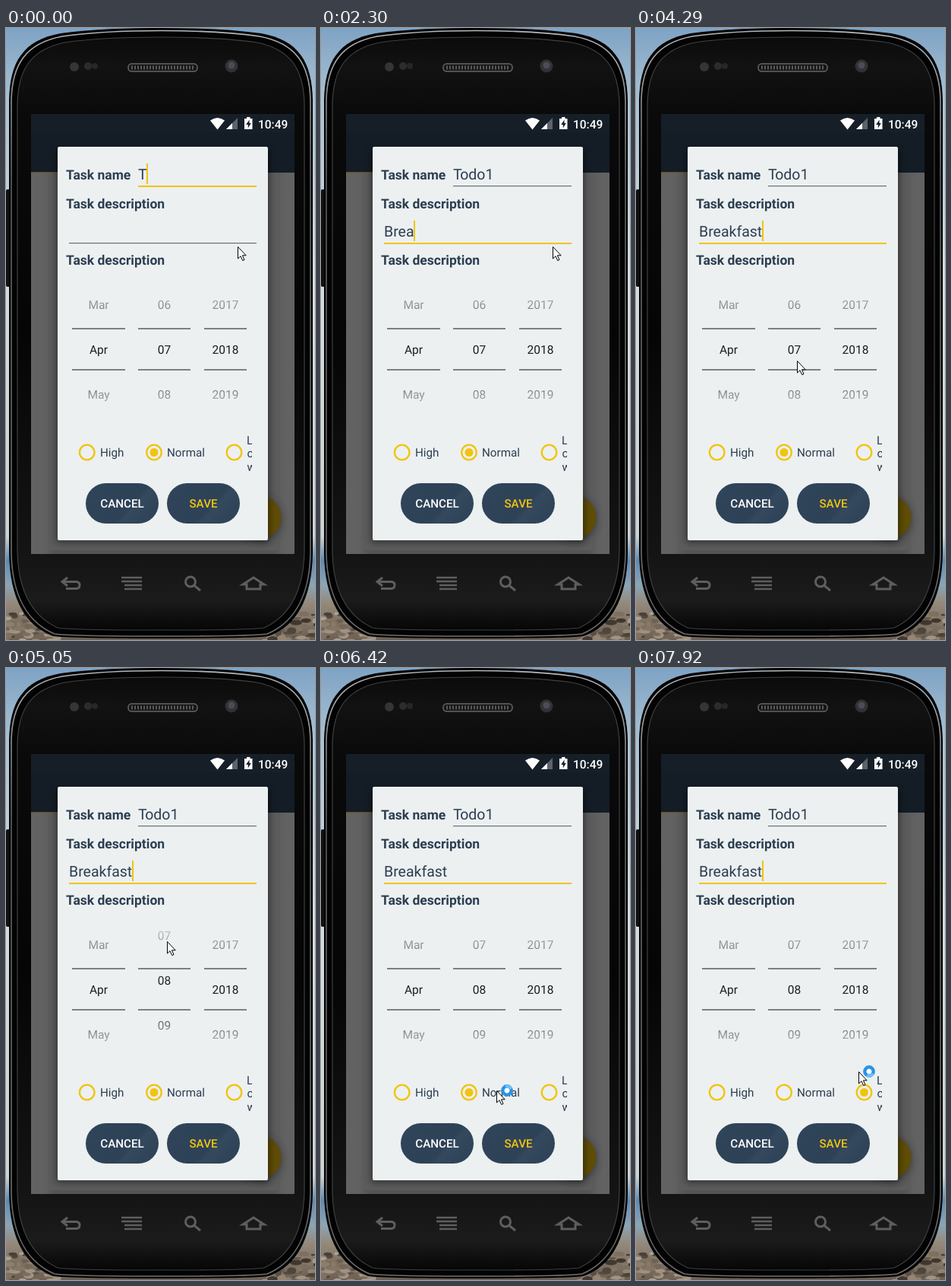
These frames come from a looping animation (407 px wide and 804 px high, 8000 ms). An HTML page:

```html
<!DOCTYPE html>
<html lang="en">
<head>
<meta charset="utf-8">
<title>Add task dialog</title>
<style>
  html, body { margin: 0; width: 100%; height: 100%; overflow: hidden; background: #000; }
  svg { display: block; width: 407px; height: 804px; }
  text { font-family: Roboto, sans-serif; text-rendering: geometricPrecision; white-space: pre; }
  .label { font-size: 17.5px; font-weight: 700; fill: #2c3e50; }
  .input { font-size: 19.5px; fill: #2c3e50; }
  .wheel { font-size: 15.5px; fill: #1c1c1c; text-anchor: middle; }
  .option { font-size: 15.2px; fill: #2c3e50; }
  .button { font-size: 15.2px; font-weight: 500; text-anchor: middle; }
  .radio { fill: none; stroke: #f1c40f; stroke-width: 2.3; }
  .yellow { fill: #f1c40f; }
  .key { fill: none; stroke: #5e5e5e; stroke-width: 3; }
</style>
</head>
<body>
<svg viewBox="0 0 407 804">
  <defs>
    <linearGradient id="sky" x2="0" y2="1">
      <stop offset="0" stop-color="#7fa3c4"/>
      <stop offset=".12" stop-color="#a9c2d4"/>
      <stop offset=".4" stop-color="#d5dcdd"/>
      <stop offset=".83" stop-color="#cdd4d3"/>
      <stop offset=".87" stop-color="#5f8bb3"/>
      <stop offset=".91" stop-color="#8ba5b5"/>
      <stop offset=".94" stop-color="#94897a"/>
      <stop offset="1" stop-color="#6b6053"/>
    </linearGradient>
    <linearGradient id="rim" x2="0" y2="1">
      <stop offset="0" stop-color="#b4b7b9"/>
      <stop offset=".12" stop-color="#8a8c8e"/>
      <stop offset=".25" stop-color="#5c5e5f"/>
      <stop offset="1" stop-color="#6c6e70"/>
    </linearGradient>
    <linearGradient id="face" x2="0" y2="1">
      <stop offset="0" stop-color="#0b0b0b"/>
      <stop offset=".05" stop-color="#121212"/>
      <stop offset=".13" stop-color="#0a0a0a"/>
      <stop offset=".5" stop-color="#050505"/>
      <stop offset=".87" stop-color="#141414"/>
      <stop offset=".95" stop-color="#1b1b1b"/>
      <stop offset="1" stop-color="#060606"/>
    </linearGradient>
    <linearGradient id="pill" x2="1" y2=".5">
      <stop offset="0" stop-color="#30455a"/>
      <stop offset=".7" stop-color="#2e4257"/>
      <stop offset=".78" stop-color="#34495e"/>
      <stop offset="1" stop-color="#2f4459"/>
    </linearGradient>
    <linearGradient id="fade" gradientUnits="userSpaceOnUse" x1="0" y1="325" x2="0" y2="521">
      <stop offset="0" stop-color="#fff" stop-opacity="0"/>
      <stop offset=".46" stop-color="#fff"/>
      <stop offset=".54" stop-color="#fff"/>
      <stop offset="1" stop-color="#fff" stop-opacity="0"/>
    </linearGradient>
    <mask id="wheelMask" maskUnits="userSpaceOnUse" x="68" y="325" width="277" height="196">
      <rect x="68" y="325" width="277" height="196" fill="url(#fade)"/>
    </mask>
    <clipPath id="screen"><rect x="33" y="113" width="347" height="578"/></clipPath>
    <clipPath id="narrow"><rect x="316" y="530" width="8" height="56"/></clipPath>
    <filter id="soft" x="-20%" y="-20%" width="140%" height="140%"><feGaussianBlur stdDeviation="5"/></filter>
  </defs>

  <!-- Backdrop -->
  <rect width="407" height="804" fill="url(#sky)"/>
  <g id="rocks"></g>

  <!-- Phone body -->
  <rect x="0" y="212" width="7" height="128" rx="2" fill="#111"/>
  <path d="M4 95C5 45 22 16 72 7C115 1 160 0 204 0S293 1 336 7C386 16 403 45 404 95V690C403 745 386 784 346 799C320 803 90 803 62 799C22 784 5 745 4 690Z" fill="#030303"/>
  <path d="M7 95C8 48 26 20 74 11C116 5 160 3.500 204 3.500S292 5 334 11C382 20 400 48 401 95V690C400 742 382 780 344 796C320 800 90 800 64 796C26 780 8 742 7 690Z" fill="none" stroke="url(#rim)" stroke-width="1.600"/>
  <path d="M15 100C16 55 32 28 78 19C118 13 160 12 204 12S290 13 330 19C376 28 392 55 393 100V688C392 738 375 772 340 788C318 792 90 792 68 788C33 772 16 738 15 688Z" fill="url(#face)" stroke="#3f4041" stroke-width="1.200"/>

  <!-- Sensors and speaker -->
  <circle cx="90" cy="51" r="6" fill="#353536"/>
  <circle cx="108" cy="50" r="5" fill="#2c2c2d"/>
  <circle cx="117" cy="50" r="4" fill="#272728"/>
  <circle cx="297" cy="50" r="8.500" fill="#313236"/>
  <circle cx="297" cy="49" r="4.500" fill="#4b4d55"/>
  <rect x="161" y="47" width="91" height="10" rx="4.500" fill="#151515" stroke="#666" stroke-width="1.500"/>
  <path d="M165 52H249" stroke="#5a5a5a" stroke-width="5" stroke-dasharray="2 2"/>

  <!-- Hardware keys -->
  <path class="key" d="M81 722L74 727.500L81 733M75 727.500H93Q97 728 97 732T93 736.500H79"/>
  <path class="key" d="M152 722H179M152 727H179M156 732H179M156 737H179" style="stroke-width: 2.4"/>
  <circle class="key" cx="243" cy="727.500" r="6.500"/>
  <path class="key" d="M248 732.500L256 739"/>
  <path class="key" d="M312 731L326 722L340 731H335V737H317V731Z"/>

  <!-- Dimmed screen -->
  <g clip-path="url(#screen)">
    <rect x="33" y="113" width="347" height="578" fill="#626262"/>
    <rect x="57" y="180" width="302" height="520" fill="#4c4c4c" opacity=".6" filter="url(#soft)"/>
    <rect x="57" y="180" width="302" height="506" rx="3" fill="#5c5c5c"/>
    <circle cx="335" cy="645" r="29" fill="#2b2b2b" opacity=".6" filter="url(#soft)"/>
    <circle cx="334.500" cy="643" r="28" fill="#5f4d06"/>
    <rect x="33" y="113" width="347" height="77" fill="#141d26"/>
    <rect x="33" y="113" width="347" height="24" fill="#161f28"/>
    <path d="M33 189.500H68" stroke="#6a510c"/>
    <rect x="66" y="160" width="281" height="516" fill="#000" opacity=".45" filter="url(#soft)"/>
  </g>

  <!-- Status bar -->
  <g fill="#fff">
    <path d="M269 121.500Q278.500 114.500 288 121.500L278.500 133.500Z"/>
    <path d="M305 118V133H290Z" fill="#5c646b"/>
    <path d="M298 125V133H290Z"/>
    <path d="M317 117H321.500V119H324.500V133H314V119H317Z"/>
    <path d="M320.500 120.500L316.200 127H318.800V131.500L322.800 125H320.500Z" fill="#161f28"/>
    <text x="332" y="132" font-size="15.500" font-weight="500">10:49</text>
  </g>

  <!-- Dialog -->
  <rect x="68" y="156" width="277" height="517" rx="2" fill="#ecf0f1"/>
  <text class="label" x="79" y="199">Task name</text>
  <text class="label" x="79" y="237">Task description</text>
  <text class="label" x="79" y="311">Task description</text>
  <rect id="nameLine" x="174" y="207" width="156"/>
  <rect id="noteLine" x="83" y="282" width="247"/>
  <text class="input" id="name" x="174" y="199" dx="0 -1.500"></text>
  <text class="input" id="note" x="83" y="274"></text>
  <rect class="yellow" id="caret" width="2" height="27"/>

  <g id="wheels" mask="url(#wheelMask)"></g>
  <path d="M87 395H157M174 395H243M261 395H317M87 449H157M174 449H243M261 449H317" stroke="#7d8081" stroke-width="2"/>

  <circle id="ripple" cx="300.500" cy="557.500" fill="#f1c40f" opacity=".22"/>
  <circle class="radio" cx="106.700" cy="557.500" r="9.800"/>
  <circle class="radio" cx="195" cy="557.500" r="9.800"/>
  <circle class="radio" cx="300.500" cy="557.500" r="9.800"/>
  <circle class="yellow" id="dot" cy="557.500" r="5.500"/>
  <text class="option" x="124" y="563">High</text>
  <text class="option" x="212" y="563">Normal</text>
  <g class="option" clip-path="url(#narrow)">
    <text x="317" y="546.500">L</text>
    <text x="317.500" y="564">o</text>
    <text x="317.500" y="581.500">w</text>
  </g>

  <rect x="105" y="598" width="96" height="53" rx="26.500" fill="url(#pill)"/>
  <rect x="212" y="598" width="96" height="53" rx="26.500" fill="url(#pill)"/>
  <text class="button" x="153" y="630" fill="#fff">CANCEL</text>
  <text class="button yellow" x="260" y="630">SAVE</text>

  <!-- Pointer -->
  <g id="pointer">
    <path d="M.5 .5V16L4 12.700L6.700 18.500L9 17.500L6.400 11.800H11.200Z" fill="#fff" stroke="#000"/>
    <g id="busy" transform="translate(14 0)">
      <circle r="5.700" fill="#fff" stroke="#2b93e4" stroke-width="4.400"/>
      <path id="glint" d="M0 -5.700A5.700 5.700 0 0 1 5.700 0" fill="none" stroke="#6cc1f6" stroke-width="4"/>
    </g>
  </g>
</svg>

<script>
const LOOP = 8000, FRAME = 136, PHASE = 28;   // the pointer is sampled once per FRAME
const KEY_GAP = 150, BLINK = 490;
const FOCUS_NOTE = 1020, TYPE_NOTE = 1760, BUSY = 5990, PICK_LOW = 7520;
const ROW = 59, MIDDLE = 428, DRAG_START = 4400, RELEASE = 5060, GRAB_Y = 430;

const moves = [
  { from: 3817, to: 4400, x: 212, y: 438 },
  { from: DRAG_START, to: 4930, x: 212, y: 359 },
  { from: RELEASE, to: 5620, x: 158, y: 557 },
  { from: 6284, to: 7100, x: 299, y: 554 },
  { from: 7660, to: 7900, x: 293, y: 530 }
];

const $ = id => document.getElementById(id);
const set = (el, attrs) => {
  for (const key in attrs) el.setAttribute(key, attrs[key]);
};
const add = (parent, tag, attrs) => {
  const el = document.createElementNS("http://www.w3.org/2000/svg", tag);
  set(el, attrs);
  return parent.appendChild(el);
};
const clamp = (v, min, max) => Math.min(max, Math.max(min, v));
const easeOut = (t, from, to) => 1 - (1 - clamp((t - from) / (to - from), 0, 1)) ** 4;

function addRocks(count) {
  let seed = 7;
  const random = () => (seed = seed * 16807 % 2147483647) / 2147483647;
  for (let i = 0; i < count; i++) {
    const x = random() * 70, light = 18 + random() * 45;
    add($("rocks"), "ellipse", {
      cx: i % 2 ? x : 407 - x,
      cy: 768 + random() * 38,
      rx: 2 + random() * 7,
      ry: 1 + random() * 3.5,
      fill: `hsl(32 14% ${light}%)`
    });
  }
}

function addWheel(x, items) {
  const group = add($("wheels"), "g", {});
  items.forEach((item, i) => {
    add(group, "text", { class: "wheel", x, y: MIDDLE + (i - 1) * ROW }).textContent = item;
  });
  return group;
}

function pointerAt(t) {
  const pos = { x: 305, y: 287 };
  for (const move of moves) {
    const k = easeOut(t, move.from, move.to);
    pos.x += (move.x - pos.x) * k;
    pos.y += (move.y - pos.y) * k;
  }
  return pos;
}

// The wheel follows the finger, then settles on the next row.
function scrollAt(t) {
  if (t < DRAG_START) return 0;
  const pulled = Math.max(0, GRAB_Y - pointerAt(Math.min(t, RELEASE)).y);
  return pulled + (ROW - pulled) * easeOut(t, RELEASE, 5620);
}

// Types one letter per KEY_GAP and returns the time of the latest key.
function type(field, word, start, t) {
  const keys = clamp(Math.floor((t - start) / KEY_GAP) + 1, 0, word.length);
  field.textContent = word.slice(0, keys);
  return keys ? start + (keys - 1) * KEY_GAP : FOCUS_NOTE;
}

function underline(line, focused) {
  set(line, { height: focused ? 2 : 1.2, fill: focused ? "#f1c40f" : "#696f72" });
}

function render(t) {
  const inNote = t >= FOCUS_NOTE;
  const field = $(inNote ? "note" : "name");
  const nameKey = type($("name"), "Todo1", 0, t);
  const noteKey = type($("note"), "Breakfast", TYPE_NOTE, t);
  underline($("nameLine"), !inNote);
  underline($("noteLine"), inNote);

  const last = field.textContent.length - 1;
  const end = last < 0 ? field.x.baseVal[0].value : field.getEndPositionOfChar(last).x;
  const blink = Math.floor((t - (inNote ? noteKey : nameKey)) / BLINK);
  set($("caret"), { x: Math.round(end - 0.5), y: inNote ? 253 : 178, opacity: 1 - blink % 2 });

  const sampled = t - (t - PHASE) % FRAME;
  const { x, y } = pointerAt(sampled);
  set($("pointer"), { transform: `translate(${Math.round(x)} ${Math.round(y)})` });
  set(days, { transform: `translate(0 ${-Math.round(scrollAt(sampled))})` });
  set($("busy"), { visibility: t < BUSY ? "hidden" : "visible" });
  set($("glint"), { transform: `rotate(${sampled / 3})` });

  const ripple = t > PICK_LOW && t < PICK_LOW + 2 * FRAME;
  set($("dot"), { cx: t < PICK_LOW ? 195 : 300.5 });
  set($("ripple"), { r: ripple ? 21 * easeOut(t, PICK_LOW - FRAME, PICK_LOW + FRAME) : 0 });
}

addRocks(110);
addWheel(122, ["Mar", "Apr", "May"]);
const days = addWheel(208.5, ["06", "07", "08", "09", "10"]);
addWheel(289, ["2017", "2018", "2019"]);

const start = performance.now();
function tick() {
  render((performance.now() - start) % LOOP);
  requestAnimationFrame(tick);
}
tick();
</script>
</body>
</html>
```
